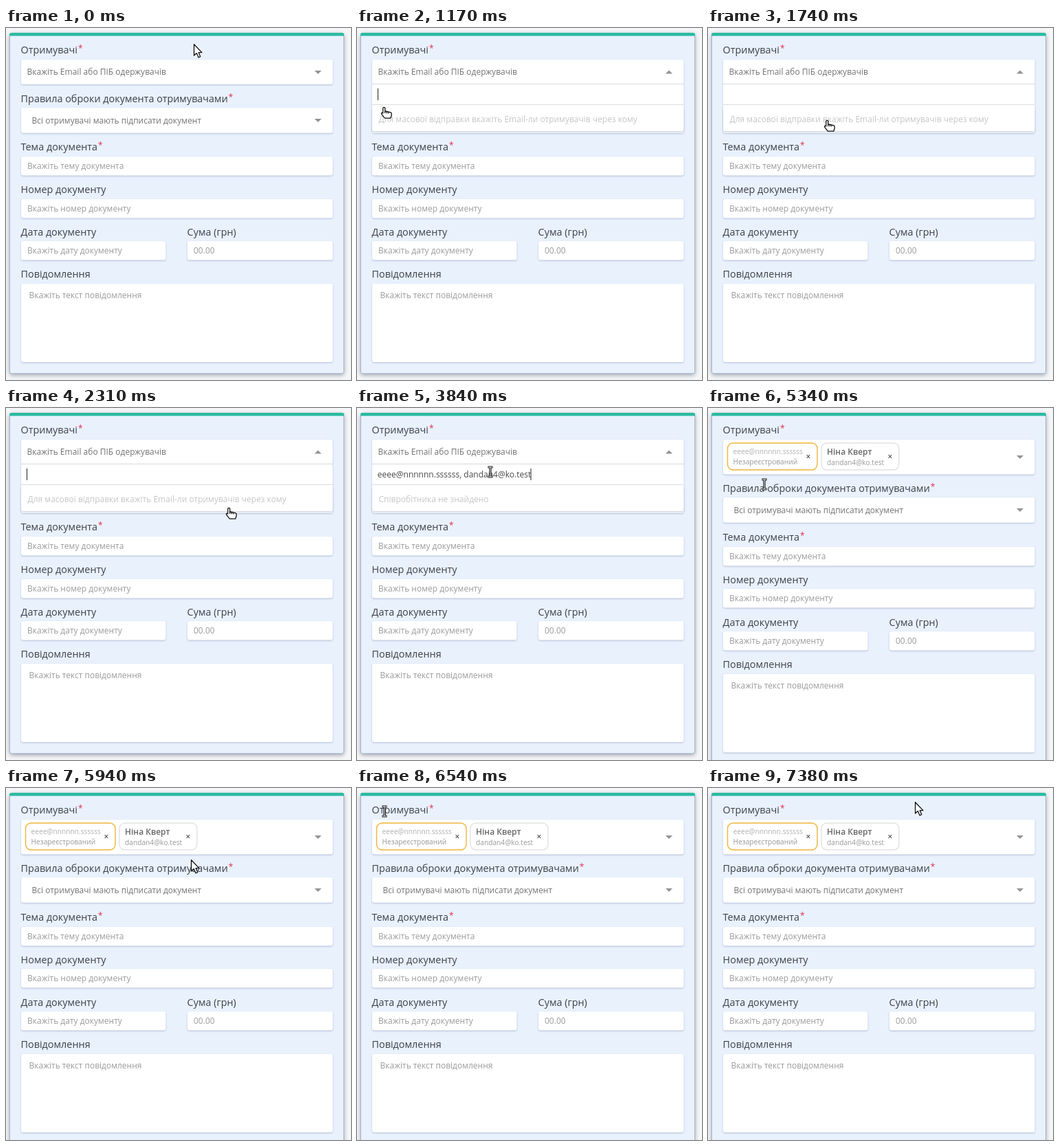
Animation, 502 px wide and 512 px high, one loop 7830 ms. Source, as an HTML page:

```html
<!DOCTYPE html>
<html lang="uk">
<head>
<meta charset="utf-8">
<title>Форма документа</title>
<style>
  html, body { margin: 0; width: 100%; height: 100%; overflow: hidden; background: #f5f6f7; }
  svg { display: block; width: 100vw; height: 100vh; font: 12px "Open Sans", "Noto Sans", sans-serif; }
  .label { font-size: 14.4px; fill: #3d424a; }
  .star { font-size: 12px; fill: #e2304c; }
  .hint { fill: #9b9b9b; }
  .select { fill: #737373; }
  .faint { fill: #c6c6c6; }
  .small { font-size: 10.2px; fill: #999; }
  .pale { font-size: 10.2px; fill: #b0b0b0; }
  .name { font-weight: 600; fill: #666; }
  .close { font-size: 12px; font-weight: 600; fill: #555; text-anchor: middle; }
  .field { fill: #fff; filter: drop-shadow(0 1px 1px rgba(60, 80, 120, .32)); }
  .card { fill: #e9f1fd; stroke: #a5b3cf; filter: drop-shadow(0 2px 3px rgba(30, 40, 60, .4)); }
  .arrow { fill: #939393; }
  .pointer { fill: #fff; stroke: #111; stroke-width: 1.3; stroke-linejoin: round; }
</style>
</head>
<body>
<svg id="stage" viewBox="0 0 502 512" preserveAspectRatio="none"></svg>
<script>
const LOOP = 7830, STEP = 30;
const OPEN = 600, PASTE = 3840, ADDED = 4920;
const FIRST = 'eeee@nnnnnn.ssssss', SECOND = 'dandan4@ko.test';

const text = (x, y, cls, body) => `<text x="${x}" y="${y}" class="${cls}">${body}</text>`;
const field = (x, y, w, h, id = '') =>
  `<rect id="${id}" class="field" x="${x}" y="${y}" width="${w}" height="${h}" rx="3"/>`;
const label = (x, y, body, required) => text(x, y, 'label',
  body + (required ? '<tspan class="star" dx="1" dy="-3">*</tspan>' : ''));
const input = (x, y, w, body) => field(x, y, w, 27.5) + text(x + 9, y + 18, 'hint', body);
const down = (x, y) => `<path class="arrow" d="M${x - 5} ${y - 2}h10l-5 5z"/>`;
const chip = (x, w, color, lines) =>
  `<rect x="${x}" y="51" width="${w}" height="39" rx="8" fill="#fff" stroke="${color}" stroke-width="1.4"/>
   ${lines}${text(x + w - 13, 75, 'close', '×')}`;

const stage = document.getElementById('stage');
stage.innerHTML = `
  <rect width="502" height="512" fill="#f5f6f7"/>
  <rect id="card" class="card" x="5.5" y="7.5" width="486" height="495" rx="3"/>
  <path d="M5 11.5V10q0-3 3-3H489q3 0 3 3v1.5z" fill="#2abba1"/>
  ${label(21.6, 37, 'Отримувачі', true)}

  <g id="rules">
    ${label(21.6, 108, 'Правила оброки документа отримувачами', true)}
    ${field(22, 116, 453.5, 36.8)}
    ${text(37.5, 139, 'select', 'Всі отримувачі мають підписати документ')}
    ${down(454, 134)}
    ${input(22, 249, 453.5, 'Вкажіть номер документу')}
  </g>
  <g id="rest">
    ${label(21.6, 178, 'Тема документа', true)}
    ${input(22, 187, 453.5, 'Вкажіть тему документа')}
    ${label(21.6, 240, 'Номер документу')}
    ${label(21.6, 302, 'Дата документу')}
    ${input(22, 310, 210.5, 'Вкажіть дату документу')}
    ${label(263.6, 302, 'Сума (грн)')}
    ${input(264, 310, 211.5, '00.00')}
    ${label(21.6, 363, 'Повідомлення')}
    ${field(22, 372, 453.5, 114)}
    ${text(33.5, 393, 'hint', 'Вкажіть текст повідомлення')}
  </g>

  ${field(22, 46, 453.5, 36, 'recipients')}
  <g id="empty">${text(30.5, 68, 'select', 'Вкажіть Email або ПІБ одержувачів')}</g>
  <g id="downArrow">${down(454, 64)}</g>
  <g id="panel">
    <path class="arrow" d="M449 66.5h10l-5-5z"/>
    ${field(22, 81.5, 453.5, 68.5)}
    <path d="M22 81.5H475.5M22 111.5H475.5" stroke="#d9dce2"/>
    <text id="query" x="29.8" y="101" fill="#484848">${FIRST}, ${SECOND}</text>
    <text id="message" x="31.5" y="137" class="faint"></text>
    <rect id="caret" y="88" width="1" height="17" fill="#222"/>
  </g>
  <g id="chips">
    ${chip(28.5, 130.5, '#efb43c',
      text(36.5, 67, 'pale', FIRST) + text(36.5, 82.3, 'small', 'Незареєстрований'))}
    ${chip(165, 113, '#e2e2e2',
      text(173, 67.5, 'name', 'Ніна Кверт') + text(173, 83.3, 'small', SECOND))}
  </g>

  <g id="cursor">
    <path id="plain" class="pointer" d="M.6 .8V17L4.4 13.6 7 19.8 9.8 18.6 7.2 12.6H12z"/>
    <g id="hand" class="pointer">
      <path d="M-1.2 9V1.8a1.5 1.5 0 0 1 3 0V6.4q1.4-.9 2.6.3 1.4-.6 2.5.5 1.3-.4 2.3.5 2 0 2 2V12l-1.4 4.2H1.4L-3 10.7Q-4 8.8-2.6 8.2z"/>
      <path d="M1.8 6v3M4.4 6.8v2.4M6.9 7.2v2.2" fill="none"/>
    </g>
    <g id="beam" fill="none">
      <path d="M-3.5-7H3.5M0-7V7M-3.5 7H3.5" stroke="#111" stroke-width="3.2"/>
      <path d="M-2.8-7H2.8M0-7V7M-2.8 7H2.8" stroke="#fff"/>
    </g>
  </g>`;

const el = {};
stage.querySelectorAll('[id]').forEach(node => { if (node.id) el[node.id] = node; });
const show = (node, on) => node.setAttribute('visibility', on ? 'visible' : 'hidden');
const shift = (node, x, y) => node.setAttribute('transform', `translate(${x} ${y})`);

// Pointer path: time, x, y of the hot spot
const path = [
  [0, 273, 23], [90, 273, 23], [480, 262, 62], [690, 262, 64], [1050, 12, 112],
  [1170, 39, 115], [2310, 324, 145], [2550, 412, 145], [3150, 194, 93], [3870, 194, 93],
  [4650, 70, 140], [4920, 70, 140], [5340, 81.5, 111], [5730, 190, 102], [6090, 300, 106],
  [6540, 40, 34], [6780, 14, 72], [7020, 150, 92], [7350, 301, 20], [LOOP, 301, 20]
];

function slope(i, axis) {
  const a = path[i - 1], b = path[i], c = path[i + 1];
  if (!a || !c || (b[axis] - a[axis]) * (c[axis] - b[axis]) <= 0) return 0;
  const before = (b[axis] - a[axis]) / (b[0] - a[0]);
  const after = (c[axis] - b[axis]) / (c[0] - b[0]);
  return 2 * before * after / (before + after);
}

function position(t, axis) {
  const i = path.findIndex(p => p[0] > t) - 1;
  const [a, b] = [path[i], path[i + 1]];
  const span = b[0] - a[0], u = (t - a[0]) / span, v = 1 - u;
  return a[axis] * v * v * (1 + 2 * u) + b[axis] * u * u * (3 - 2 * u)
    + span * u * v * (slope(i, axis) * v - slope(i + 1, axis) * u);
}

function pointerKind(x, y, open, added) {
  const inside = (left, top, right, bottom) => x >= left && x <= right && y >= top && y <= bottom;
  if (open && inside(22, 82, 475, 111)) return 'beam';
  if (inside(22, 25, 104, 42) || (added && inside(22, 108, 322, 127))) return 'beam';
  return inside(22, 46, 475, added ? 97 : open ? 150 : 82) ? 'hand' : 'plain';
}

function draw(t) {
  const added = t >= ADDED, open = t >= OPEN && !added, pasted = t >= PASTE;
  show(el.panel, open);
  show(el.downArrow, !open);
  show(el.empty, !added);
  show(el.chips, added);
  show(el.query, open && pasted);
  el.message.textContent = pasted ? 'Співробітника не знайдено'
    : 'Для масової відправки вкажіть Email-ли отримувачів через кому';

  const blinkOn = pasted ? (t - PASTE) % 1000 < 500 : t < 1510 || (t - 10) % 1000 < 500;
  show(el.caret, open && blinkOn);
  el.caret.setAttribute('x', pasted ? 252.5 : 30);

  shift(el.rules, 0, added ? 14 : 0);
  shift(el.rest, 0, added ? 15 : 0);
  shift(el.downArrow, 0, added ? 7 : 0);
  el.recipients.setAttribute('height', added ? 50.5 : 36);
  el.card.setAttribute('height', added ? 510 : 495);

  const x = Math.round(position(t, 1)), y = Math.round(position(t, 2));
  const kind = pointerKind(x, y, open, added);
  shift(el.cursor, x, y);
  for (const name of ['plain', 'hand', 'beam']) show(el[name], name === kind);
}

const start = performance.now();
function tick() {
  const t = (performance.now() - start) % LOOP;
  draw(Math.floor(t / STEP) * STEP);
  requestAnimationFrame(tick);
}
tick();
</script>
</body>
</html>
```
